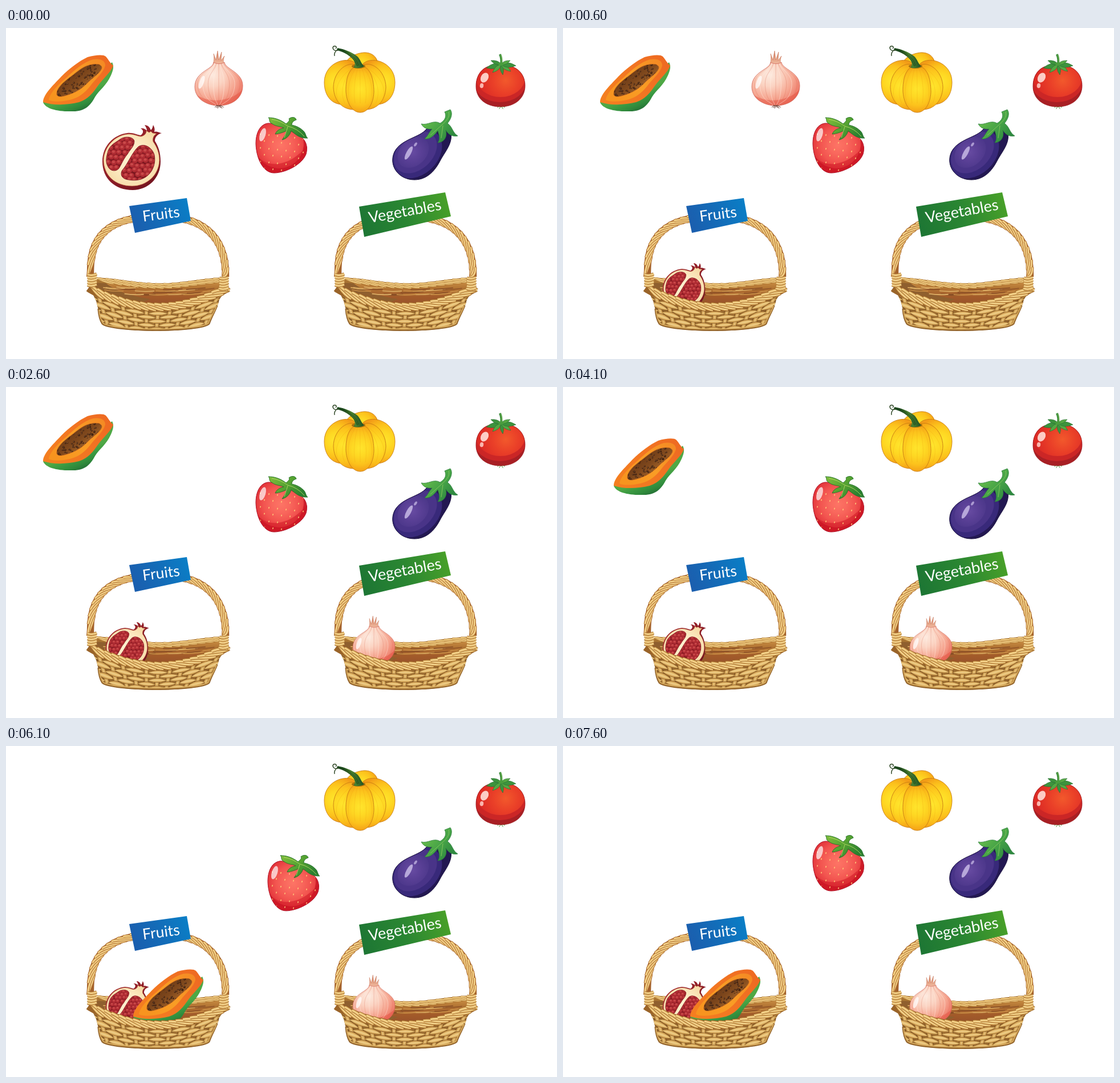
Animation of 966x580 px, one loop 8000 ms. Source, as an HTML page with a canvas:

```html
<!DOCTYPE html>
<html lang="en">
<head>
<meta charset="utf-8">
<title>Sorting fruits and vegetables</title>
<style>
html, body { margin: 0; width: 100%; height: 100%; overflow: hidden; background: #fff; }
canvas { display: block; width: 966px; height: 580px; }
</style>
</head>
<body>
<canvas id="stage" width="966" height="580"></canvas>
<script>
const ctx = document.getElementById('stage').getContext('2d');
const LOOP = 8000;

const noise = n => { const v = Math.sin(n * 127.1 + 3.7) * 43758.5453; return v - Math.floor(v); };

function stops(g, colors) {
  colors.forEach((c, i) => g.addColorStop(i / (colors.length - 1), c));
  return g;
}
const lin = (x0, y0, x1, y1, ...c) => stops(ctx.createLinearGradient(x0, y0, x1, y1), c);
const rad = (x, y, r, ...c) => stops(ctx.createRadialGradient(x, y, 0, x, y, r), c);

function fill(d, color) {
  ctx.fillStyle = color;
  ctx.fill(new Path2D(d));
}
function line(d, color, w = 1) {
  ctx.strokeStyle = color;
  ctx.lineWidth = w;
  ctx.stroke(new Path2D(d));
}
function oval(x, y, rx, ry, color, rot = 0) {
  ctx.fillStyle = color;
  ctx.beginPath();
  ctx.ellipse(x, y, rx, ry, rot, 0, 7);
  ctx.fill();
}
function clipped(d, draw) {
  ctx.save();
  ctx.clip(new Path2D(d));
  draw();
  ctx.restore();
}

// ---------- produce ----------

function papaya() {
  fill('M65 130C69 142 92 147 118 146C138 146 148 136 156 121C164 108 176 101 184 83C189 72 189 66 186 60L150 90Z',
    lin(120, 118, 132, 147, '#4fa845', '#3b9a42', '#2f8a3c', '#236b35'));
  const face = 'M65 130C65 117 81 102 97 85C111 71 128 58 143 51C157 47 171 46 175 50C179 54 182 61 188 66C184 77 172 87 162 100C153 113 144 125 128 130C108 135 83 136 65 130Z';
  fill(face, lin(75, 120, 182, 58, '#f47e20', '#f27522', '#ee6a22'));
  fill('M75 126C77 113 93 98 106 87C120 74 135 60 153 55C166 53 174 57 174 66C171 78 159 87 149 100C138 114 128 122 112 126C98 129 82 130 75 126Z',
    lin(85, 118, 172, 62, '#f7941f', '#f99d25', '#f48a24'));
  const hole = 'M89 117C88 107 98 97 110 88C121 80 133 68 146 65C157 62 167 63 168 69C167 77 156 84 146 93C137 103 126 111 112 116C103 119 92 123 89 117Z';
  fill(hole, lin(110, 82, 135, 112, '#6b3a18', '#80491d', '#a5652a'));
  clipped(hole, () => {
    for (let i = 0; i < 100; i++) {
      const t = noise(i), s = (noise(i + 300) - .5) * 28;
      const x = 91 + 76 * t + s * .45, y = 117 - 50 * t + s;
      const r = 1 + noise(i + 600) * .9;
      oval(x, y, r, r, '#41210f');
      oval(x - .4, y - .5, .5, .5, '#b98657');
    }
  });
  line(hole, '#b8601e', .8);
}

function onion() {
  const wisps = 'M363 64C365 57 365 51 364 45L368 56L371 40L373 56L378 42L377 57L383 49C380 57 381 62 384 66Z';
  fill(wisps, lin(0, 40, 0, 66, '#cf7757', '#f6c4aa'));
  line(wisps, '#c26a4d', .5);
  const bulb = 'M364 60C363 73 331 76 331 103C331 124 352 136 373 136C395 136 415 124 415 101C415 77 384 72 383 60C376 64 369 63 364 60Z';
  fill(bulb, rad(362, 82, 62, '#fdeadf', '#fbd3c2', '#f6a893', '#ec705f'));
  clipped(bulb, () => {
    fill('M331 114C349 132 394 132 416 106L418 140H330Z', 'rgba(224,66,52,.38)');
    for (let i = -4; i <= 4; i++) {
      const k = i * 9.2;
      line(`M${373 + i * 1.9} 57C${373 + i * 2} 75 ${373 + k * 1.15} 78 ${373 + k} 104S${373 + i * 3} 128 ${373 + i} 137`,
        i % 2 ? 'rgba(255,240,230,.6)' : 'rgba(214,100,80,.4)', .8);
    }
  });
  oval(343, 95, 4, 12, 'rgba(255,255,255,.7)', .35);
  line(bulb, '#d0685a', .8);
  for (let i = 0; i < 7; i++) line(`M${370 + i} 135L${366 + i * 2.6} ${139 + i % 3}`, '#59291c', .9);
}

function pumpkin() {
  const lobe = (d, x, y, r) => {
    fill(d, rad(x, y, r, '#ffe52c', '#fed823', '#fcc21c', '#f39c17'));
    line(d, '#c97c14', .9);
  };
  const mirrored = draw => {
    draw();
    ctx.save();
    ctx.translate(1240, 0);
    ctx.scale(-1, 1);
    draw();
    ctx.restore();
  };
  lobe('M592 70C596 50 615 44 628 43C644 43 652 52 654 70Z', 622, 66, 32);
  mirrored(() => lobe('M617 66C604 46 558 58 558 95C558 119 571 135 593 134L617 90Z', 577, 94, 42));
  mirrored(() => lobe('M619 68C602 54 574 74 574 104C575 127 589 143 610 143L620 90Z', 591, 102, 44));
  lobe('M620 68C603 64 595 87 596 112C598 135 609 148 621 148C633 148 644 135 645 112C645 87 637 64 620 68Z', 621, 107, 43);
  for (let i = -4; i <= 4; i++)
    line(`M${620 + i * 2} 68C${621 + i * 8} 78 ${621 + i * 13} 108 ${621 + i * 9} 132`, 'rgba(232,150,14,.3)', .8);
  oval(618, 67, 12, 4, '#a9720f');
  fill('M609 69C614 65 612 57 603 50C596 44 588 41 580 39L581 35C593 37 606 42 615 49C622 55 623 64 628 67C622 71 614 71 609 69Z',
    lin(596, 55, 619, 47, '#1d4a1e', '#4b8130', '#245525'));
  line('M585 37C596 40 613 49 618 66M588 40C602 46 611 53 616 67', '#183f1a', .8);
  line('M584 38C577 42 573 38 573 34C575 29 582 33 578 36M581 38C577 41 575 45 576 49', '#263f1d', 1.4);
}

function tomato() {
  for (let i = 0; i < 5; i++) line(`M868 136L${861 + i * 3.5} ${139 + i % 2 * 3}`, '#5aa04b', 1);
  const body = 'M865 66C838 62 824 80 824 102C824 125 843 138 867 138C891 138 910 124 910 101C910 78 892 62 865 66Z';
  fill(body, '#a81f24');
  clipped(body, () => {
    oval(866, 94, 46, 36, '#cb2626');
    oval(867, 87, 43, 34, rad(876, 92, 44, '#f2592c', '#ea4028', '#dd2c25'));
  });
  line(body, '#9c1a20', .8);
  oval(839, 87, 6.5, 9, 'rgba(255,222,215,.9)', .5);
  oval(834, 101, 3.2, 4.2, 'rgba(255,205,198,.85)', .1);
  line('M868 64C869 58 869 53 866 46', '#3b8a3b', 4);
  line('M869 62C870 57 869 52 867 47', '#6ab24c', 1.3);
  const leaves = [[842, 70], [853, 78], [871, 82], [885, 76], [894, 66], [884, 57], [850, 57]];
  leaves.forEach(([x, y], i) => {
    const dx = x - 868, dy = y - 64;
    const side = k => `${868 + dx * .4 - dy * k} ${64 + dy * .4 + dx * k}`;
    const leaf = `M868 64Q${side(.32)} ${x} ${y}Q${side(-.32)} 868 64Z`;
    fill(leaf, i % 2 ? '#55a843' : '#3c933d');
    line(leaf, '#266b33', .6);
  });
  oval(868, 63, 5, 3, '#4a9d3e');
}

function strawberry() {
  const body = 'M459 167C445 169 438 184 438 203C439 231 452 254 470 254C489 254 519 240 526 221C530 208 526 195 513 188C497 181 481 166 459 167Z';
  fill(body, '#cf1d2a');
  clipped(body, () => {
    oval(479, 203, 43, 43, rad(482, 205, 46, '#fd7465', '#f9685d', '#f2544f', '#e2343a'), -.3);
    fill('M437 219C457 252 504 240 530 203L530 260H437Z', 'rgba(205,20,34,.5)');
    for (let r = 0; r < 6; r++)
      for (let c = 0; c < 6; c++)
        oval(446 + c * 15 + r % 2 * 7, 186 + r * 12 + c * 1.6, .8, 1.6, '#ffd27c', .2);
  });
  oval(450, 187, 5, 12, 'rgba(255,255,255,.7)', .3);
  line(body, '#b0162a', 1);
  const leaf = 'M491 168C481 160 470 157 460 157C464 161 459 164 467 168C474 173 481 172 487 175C479 177 474 180 472 186C480 185 486 183 492 180C490 187 487 192 484 196C493 194 498 187 500 180C507 186 515 194 529 193C525 190 526 184 521 180C515 174 507 171 501 170C501 165 505 162 509 161C508 156 501 155 496 159C498 163 494 165 491 168Z';
  fill(leaf, lin(468, 158, 510, 196, '#79b93a', '#54a231', '#2b7f30'));
  line(leaf, '#23702b', .9);
  line('M466 160Q482 163 494 172Q511 176 523 190M494 173L488 192', '#b6d968', .9);
}

function eggplant() {
  const body = 'M737 177C726 192 693 194 681 217C670 241 688 266 716 266C739 266 753 249 762 231C771 215 783 202 780 184C770 168 750 167 737 177Z';
  fill(body, '#231852');
  clipped(body, () => {
    oval(720, 220, 50, 37, '#38297a', -.75);
    oval(718, 218, 43, 30, '#493488', -.75);
    oval(714, 218, 31, 23, rad(712, 217, 31, '#674ba2', '#5a4096', '#4d388b'), -.75);
  });
  line(body, '#1b123f', 1);
  oval(706, 219, 4, 13, 'rgba(205,192,234,.8)', .5);
  oval(718, 204, 2, 4, 'rgba(205,192,234,.7)', .6);
  const cap = 'M761 167C770 162 773 154 769 147L779 143C784 150 780 160 774 167C783 173 783 184 792 189C783 191 776 187 771 179C774 190 769 200 757 201C762 194 759 187 757 180C751 188 743 196 734 194C740 189 742 182 747 177C740 178 732 176 728 168C740 171 750 160 761 167Z';
  fill(cap, lin(738, 162, 777, 194, '#62b84a', '#46a347', '#2f8a40'));
  line(cap, '#2a7d3b', .8);
  line('M776 147C779 156 771 164 764 170L744 188M766 171L763 193', '#93cc61', .8);
}

function seeds(d, x0, y0, x1, y1) {
  fill(d, '#7a161e');
  clipped(d, () => {
    let row = 0;
    for (let y = y0; y < y1; y += 8.4, row++)
      for (let x = x0 + row % 2 * 4.7; x < x1; x += 9.4) {
        const px = x + noise(x + y) * 2, py = y + noise(x * 2 + y) * 2;
        oval(px, py, 4.9, 4.6, '#b02c33');
        oval(px - .6, py - 1, 2.6, 2.2, '#c94a4a');
      }
  });
  line(d, '#7d1a22', .8);
}

function pomegranate() {
  const skin = 'M236 188C242 184 241 178 236 176C241 175 244 177 247 180C247 176 245 173 243 170C251 171 252 175 254 179C257 176 257 173 258 170C261 175 261 178 260 182C265 180 269 184 273 184C264 187 261 192 261 198C267 207 271 218 271 234C271 263 249 284 222 284C191 284 169 264 169 234C169 206 189 187 213 184C222 183 229 187 236 188Z';
  fill(skin, lin(175, 190, 255, 280, '#a3282c', '#8b1c27', '#73141f'));
  const flesh = 'M237 190C244 188 246 184 246 180L251 183L254 181L257 184L264 185C258 189 257 194 258 199C265 209 269 219 269 232C268 258 247 277 221 277C191 277 171 258 171 231C172 208 191 188 213 186C224 185 230 190 237 190Z';
  fill(flesh, rad(220, 228, 58, '#fff1d0', '#fceac2', '#f5d9a4'));
  line(flesh, '#b24e35', .7);
  seeds('M178 219C181 205 192 201 200 195C208 189 223 190 225 198C225 208 217 213 213 221C206 229 203 238 198 246C192 253 182 250 179 243C174 235 176 227 178 219Z', 174, 192, 230, 256);
  seeds('M232 208C242 201 256 209 260 222C263 236 258 249 250 257C240 267 226 268 215 266C204 265 199 257 204 249C212 241 221 218 232 208Z', 201, 206, 266, 272);
}

// ---------- baskets ----------

const power = (v, p) => Math.sign(v) * Math.abs(v) ** p;
const dip = u => Math.max(0, Math.sin(Math.PI * Math.min(1, Math.max(0, u))));
const handleAt = u => {
  const a = Math.PI * (1 - u), e = .72 + .11 * u;
  return [266.5 + 118.5 * power(Math.cos(a), e), 436 - 105 * dip(u) ** e];
};
const backAt = u => [160 + 218 * u, 442 + 10 * dip(u) ** 1.6];
const rimAt = u => [145 + 243 * u, 455 + 34 * dip(u) ** .85];

// overlapping strands wound along a curve
function twist(at, n, w, len, dark = '#9a6429') {
  ctx.beginPath();
  for (let i = 0; i <= 80; i++) ctx.lineTo(...at(i / 80));
  ctx.strokeStyle = dark;
  ctx.lineWidth = 2 * w;
  ctx.stroke();
  const off = (u, d) => {
    u = Math.min(1, Math.max(0, u));
    const [a, b] = at(Math.max(0, u - .005)), [c, e] = at(Math.min(1, u + .005)), [x, y] = at(u);
    const l = Math.hypot(c - a, e - b);
    return [x - (e - b) / l * d, y + (c - a) / l * d];
  };
  const k = w * .72;
  for (let i = -1; i < n; i++) {
    const u = i / n;
    [[dark, w * .8], ['#e3b566', w * .58], ['#f6d995', w * .22]].forEach(([c, width]) => {
      ctx.strokeStyle = c;
      ctx.lineWidth = width;
      ctx.beginPath();
      ctx.moveTo(...off(u, -k));
      ctx.bezierCurveTo(...off(u + len * .35, -k), ...off(u + len * .65, k), ...off(u + len, k));
      ctx.stroke();
    });
  }
}

function basketBack() {
  twist(handleAt, 30, 6.2, .11, '#a4622c');
  const inside = 'M155 440C180 438 211 452 259 451C307 449 335 440 380 442L388 456C348 499 190 500 149 454Z';
  fill(inside, lin(0, 441, 0, 487, '#cf9448', '#b27433', '#a25a2a', '#96512a'));
  clipped(inside, () => {
    fill('M150 444L174 446C190 461 222 470 253 475L220 489L150 460Z', '#8f5f2e');
    for (let i = 0; i < 26; i++) {
      const x = 168 + noise(i) * 180, u = (x - 150) / 236;
      const y = 448 + 10 * dip(u) + noise(i + 50) * 12;
      line(`M${x} ${y}q16 ${4 - u * 6} 34 ${3 - u * 8}`, ['#dcae65', '#8a4f26', '#c88d45'][i % 3], 1 + noise(i + 90));
    }
  });
  twist(backAt, 15, 4.6, .2, '#a87332');
}

function bodyAt(u, v) {
  const l = 149 + 20 * v, r = 386 - 28 * v;
  const top = rimAt(u)[1], low = 514 + 16 * dip(u) ** .65;
  return [l + (r - l) * u, top + (low - top) * v];
}

function weave() {
  const body = 'M146 458C152 466 159 476 161 490C163 503 165 511 169 518C186 535 342 535 356 518C361 503 371 490 374 476C379 467 385 463 388 456C340 500 195 500 146 458Z';
  fill(body, lin(150, 0, 386, 0, '#8b5f2a', '#9c6d30', '#a57637', '#9a6a2f', '#85582a'));
  clipped(body, () => {
    const cols = 11, rows = 6;
    for (let c = 0; c < cols; c++) {
      const m = (c + .5) / cols, a = bodyAt(m, 0), b = bodyAt(m, 1);
      line(`M${a} L${b}`, '#7d5222', 9);
      line(`M${a} L${b}`, '#cf9f52', 6.5);
      line(`M${a} L${b}`, '#e5bf77', 2.5);
    }
    for (let r = 0; r < rows; r++)
      for (let c = -1; c <= cols; c++) {
        if ((r + c) % 2) continue;
        const v = (r + .65) / rows, m = (c + .5) / cols, s = .82 / cols;
        const p = bodyAt(m - s, v), q = bodyAt(m + s, v), k = bodyAt(m, v);
        const h = (bodyAt(m, 1)[1] - bodyAt(m, 0)[1]) / rows * .92;
        const strip = g => `M${p[0]} ${p[1] + 1}Q${k[0]} ${k[1] - g - 1} ${q[0]} ${q[1] + 1}Q${k[0]} ${k[1] + g} ${p[0]} ${p[1] + 1}Z`;
        fill(strip(h + 1.5), '#805323');
        fill(strip(h), '#d5a658');
        fill(strip(h * .45), '#ecc981');
      }
  });
  line('M162 492C163 504 165 512 169 518C186 533 342 533 356 518C360 506 367 495 370 486', '#94652d', 3.2);
  line('M163 494C164 504 166 511 170 517C187 531 341 531 355 517C359 506 366 496 369 487', '#d9ad60', 1.8);
}

function wrap(x, y) {
  for (let i = 0; i < 5; i++) {
    const d = `M${x - 8} ${y + i * 4.6}q7 3 16 -1`;
    line(d, '#a06a2d', 5.4);
    line(d, '#e5b96b', 4);
    line(d, '#f6da9a', 1.3);
  }
}

function basketFront() {
  weave();
  twist(rimAt, 19, 7.4, .17);
  wrap(151, 432);
  wrap(382, 438);
}

function sign(d, color, text, x, y, deg, size) {
  fill(d, color);
  ctx.save();
  ctx.translate(x, y);
  ctx.rotate(deg * Math.PI / 180);
  ctx.font = `${size}px Lato, "Open Sans", sans-serif`;
  ctx.textAlign = 'center';
  ctx.textBaseline = 'alphabetic';
  ctx.fillStyle = '#fff';
  ctx.fillText(text, 0, 0);
  ctx.restore();
}

function bothBaskets(draw) {
  [0, 434].forEach(x => {
    ctx.save();
    ctx.translate(x, 0);
    draw();
    ctx.restore();
  });
}

// ---------- motion ----------

// home centre, drop centre, final scale, sideways bend, start time, optional return time
const items = [
  { draw: pomegranate, home: [220, 233], drop: [212, 458], scale: .73, bend: 0, at: 100 },
  { draw: onion, home: [373, 100], drop: [645, 454], scale: .88, bend: .08, at: 2100 },
  { draw: papaya, home: [126, 97], drop: [284, 441], scale: 1, bend: .15, at: 4100 },
  { draw: pumpkin },
  { draw: tomato },
  { draw: eggplant },
  { draw: strawberry, home: [483, 205], drop: [672, 442], scale: 1, bend: -.2, at: 6100, back: 7600 }
];

function progress(item, t) {
  if (!item.home || t < item.at || t >= item.back) return 0;
  const s = Math.min(6, Math.floor((t - item.at) / 100) + 1) / 6;
  return .65 * s + .35 * s * s * (3 - 2 * s);
}

function place(item, t) {
  const p = progress(item, t);
  if (!p) return item.draw();
  const [x, y] = item.home, [dx, dy] = item.drop;
  const px = p + item.bend * p * (1 - p), py = p - item.bend * .55 * p * (1 - p);
  const k = 1 + (item.scale - 1) * p;
  ctx.save();
  ctx.translate(x + (dx - x) * px, y + (dy - y) * py);
  ctx.scale(k, k);
  ctx.translate(-x, -y);
  item.draw();
  ctx.restore();
}

function render(t) {
  ctx.fillStyle = '#fff';
  ctx.fillRect(0, 0, 966, 580);
  ctx.lineJoin = 'round';
  bothBaskets(basketBack);
  sign('M216 312L317 298L324 338L226 359Z', lin(222, 345, 318, 305, '#1b5eae', '#136cb8', '#0a7ec6'),
    'Fruits', 273, 335, -7.5, 26.5);
  sign('M619 313L770 288L780 330L628 366Z', lin(624, 350, 774, 300, '#1d7634', '#2a8632', '#48a029'),
    'Vegetables', 701, 330, -10.5, 27);
  items.forEach(item => place(item, t));
  bothBaskets(basketFront);
}

const start = performance.now();
let shown = -1;
function tick(now) {
  const t = Math.max(0, now - start) % LOOP;
  const step = Math.floor(t / 100);
  if (step !== shown) {
    shown = step;
    render(t);
  }
  requestAnimationFrame(tick);
}
render(0);
requestAnimationFrame(tick);
</script>
</body>
</html>
```
